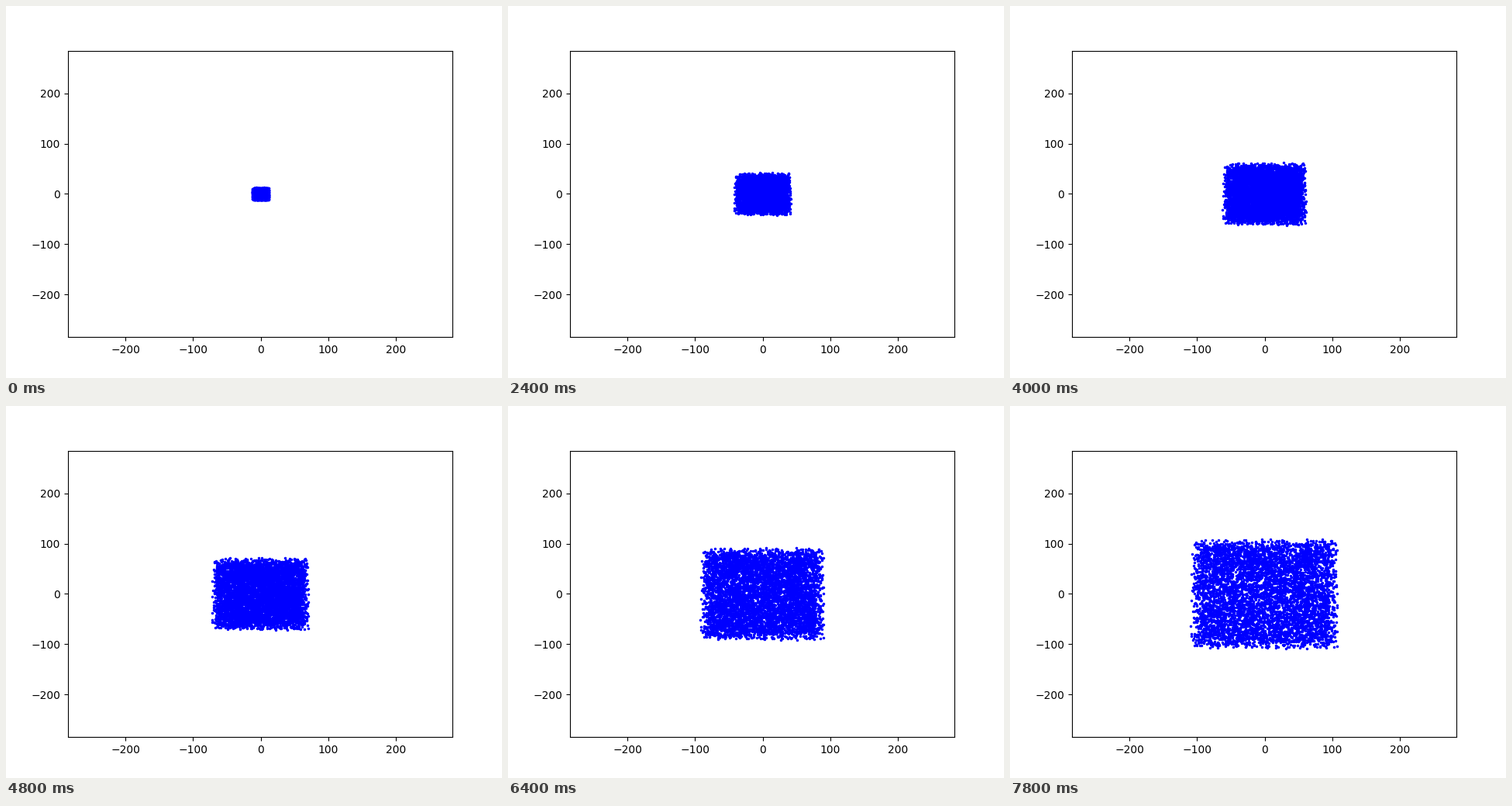
Write a matplotlib script that moves like this. It is 640x480 px and loops after 8000 ms.

```python
import numpy as np
import matplotlib.pyplot as plt
from matplotlib.animation import FuncAnimation

FRAMES = 40
INTERVAL = 200
COUNT = 6000
START = 10      # half side of the initial square
SPEED = 2.5     # largest step per frame along each axis

rng = np.random.default_rng(7)
origin = rng.uniform(-START, START, (2, COUNT))
velocity = rng.uniform(-SPEED, SPEED, (2, COUNT))

fig, ax = plt.subplots(figsize=(6.4, 4.8), dpi=100)
ax.set_xlim(-284.8, 283.4)
ax.set_ylim(-284.6, 284.8)
dots, = ax.plot([], [], "bo", markersize=1.5)


def update(i):
    x, y = origin + velocity * (i + 1)
    dots.set_data(x, y)
    return dots,


def reset():
    return update(0)


anim = FuncAnimation(fig, update, frames=FRAMES, init_func=reset,
                     interval=INTERVAL, repeat=True, repeat_delay=0)
plt.show()
```
